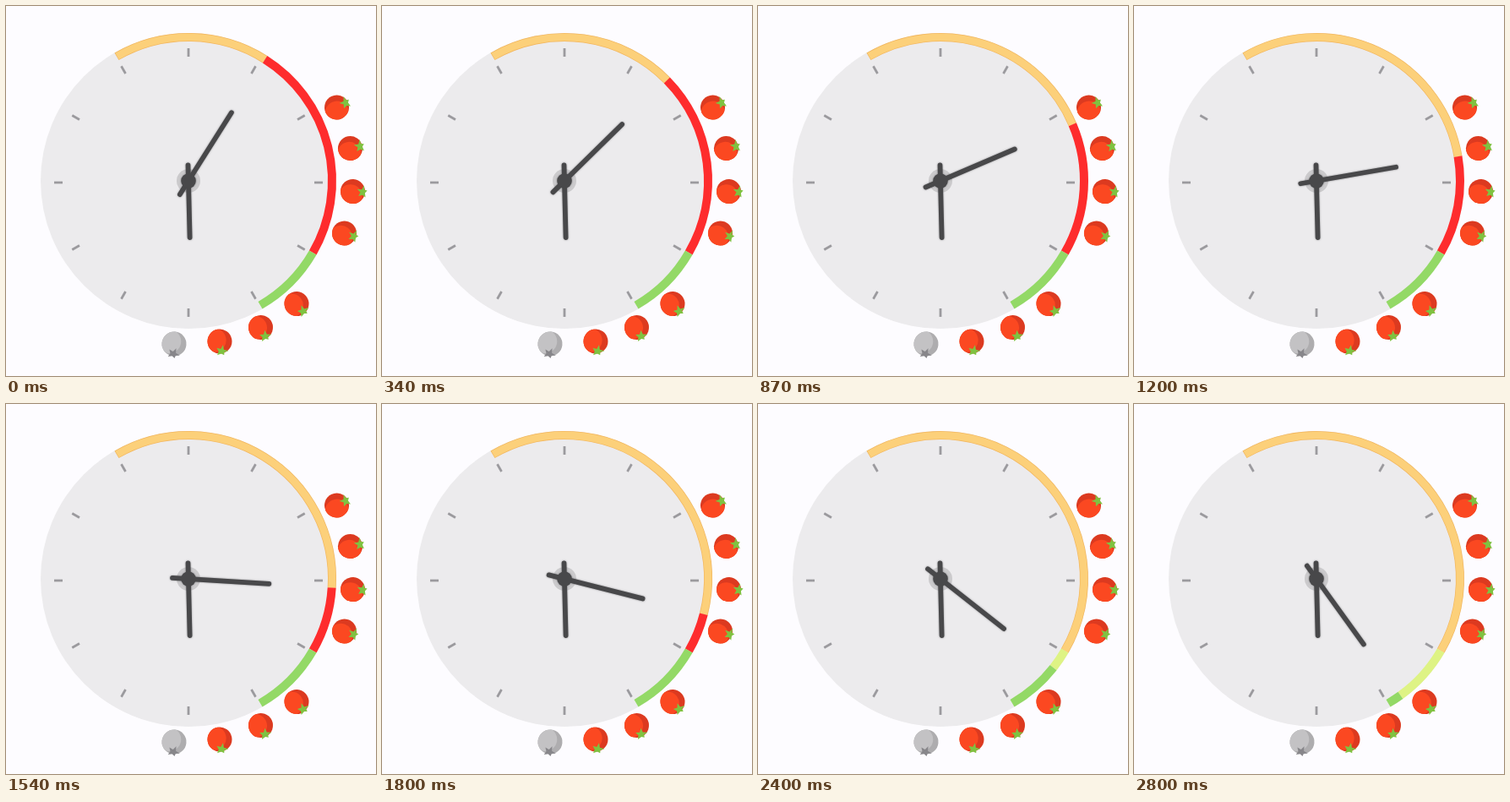
An HTML page that plays this animation: 438x438 px, repeating every 2870 ms.

```html
<!DOCTYPE html>
<html lang="en">
<head>
<meta charset="utf-8">
<title>Interval timer</title>
<style>
  html, body { margin: 0; width: 100%; height: 100%; overflow: hidden; background: #fdfcff; }
  svg { display: block; width: 100vw; height: 100vh; }
  .arc { fill: none; stroke-width: 10; }
  .hand { stroke: #48484a; stroke-width: 5.8; stroke-linecap: round; }
  .hands { filter: drop-shadow(0 0 1.3px rgba(60, 60, 64, .5)); }
</style>
</head>
<body>
<svg viewBox="0 0 438 438">
  <defs>
    <clipPath id="ball"><circle r="14.5"/></clipPath>
  </defs>
  <circle cx="216" cy="207" r="175" fill="#ecebed"/>
  <g id="ticks" stroke="#9b9a9e" stroke-width="2.8"></g>
  <path id="workEdge" class="arc" stroke="#f3b75f"/>
  <path id="workDone" class="arc" stroke="#fcd07a" style="stroke-width:8.6"/>
  <path id="workLeft" class="arc" stroke="#fe2c2d"/>
  <path id="restDone" class="arc" stroke="#def384"/>
  <path id="restLeft" class="arc" stroke="#93d966"/>
  <g id="tomatoes"></g>
  <circle cx="216" cy="207" r="14" fill="#cbcacc"/>
  <g class="hands">
    <path class="hand" d="M215.5 188.5L217.6 274"/>
    <path class="hand" id="minute" d="M216 226V111.5"/>
    <circle cx="216" cy="207" r="8.8" fill="#48484a"/>
  </g>
</svg>
<script>
const CX = 216, CY = 207, RING = 170;
const WORK_START = -30, WORK_END = 120, REST_END = 150;
const LOOP = 2870, FIRST_ANGLE = 32.2, STEP_ANGLE = 8 / 3;
const $ = id => document.getElementById(id);

// Angles run clockwise from twelve o'clock.
function point(deg) {
  const a = deg * Math.PI / 180;
  return `${(CX + RING * Math.sin(a)).toFixed(2)} ${(CY - RING * Math.cos(a)).toFixed(2)}`;
}

function setArc(id, from, to) {
  const large = to - from > 180 ? 1 : 0;
  $(id).setAttribute('d', to > from
    ? `M${point(from)}A${RING} ${RING} 0 ${large} 1 ${point(to)}` : '');
}

function tomato([x, y], i, all) {
  const spent = i < all.length - 1;
  const [dark, light, leaf] = spent
    ? ['#dc3a20', '#fb4821', '#7fc241'] : ['#aeadaf', '#c3c2c4', '#87868a'];
  const turn = Math.atan2(y - CY, x - CX) * 180 / Math.PI;
  return `<g transform="translate(${x} ${y}) rotate(${turn.toFixed(1)})">
    <circle r="14.5" fill="${dark}"/>
    <circle cx="-2.5" cy="6" r="14" fill="${light}" clip-path="url(#ball)"/>
    <path fill="${leaf}" d="M13-8L13.5-3 17-2 14.5 1 15.5 6 11.5 3.5 7 5 9 .5 5-3 10.5-3Z"/>
  </g>`;
}

$('ticks').innerHTML = Array.from({ length: 12 }, (_, i) =>
  `<path d="M216 50V60" transform="rotate(${i * 30} 216 209)"/>`).join('');

$('tomatoes').innerHTML = [
  [391.5, 120], [407.5, 168.5], [410.5, 219.5], [400.5, 269],
  [344, 352.5], [301.5, 380.5], [253, 397], [199, 400]
].map(tomato).join('');

function draw(now) {
  // Fifteen steps a second, on a 10 ms clock.
  const step = Math.floor(Math.floor((now % LOOP) / 10) * 3 / 20);
  const angle = FIRST_ANGLE + step * STEP_ANGLE;
  const worked = Math.min(angle, WORK_END);
  const rested = Math.max(angle, WORK_END);
  setArc('workEdge', WORK_START, worked);
  setArc('workDone', WORK_START + .25, worked);
  setArc('workLeft', worked, WORK_END);
  setArc('restDone', WORK_END, rested);
  setArc('restLeft', rested, REST_END);
  $('minute').setAttribute('transform', `rotate(${angle.toFixed(3)} ${CX} ${CY})`);
}

let start;
function tick(now) {
  start ??= now;
  draw(now - start);
  requestAnimationFrame(tick);
}
draw(0);
requestAnimationFrame(tick);
</script>
</body>
</html>
```
